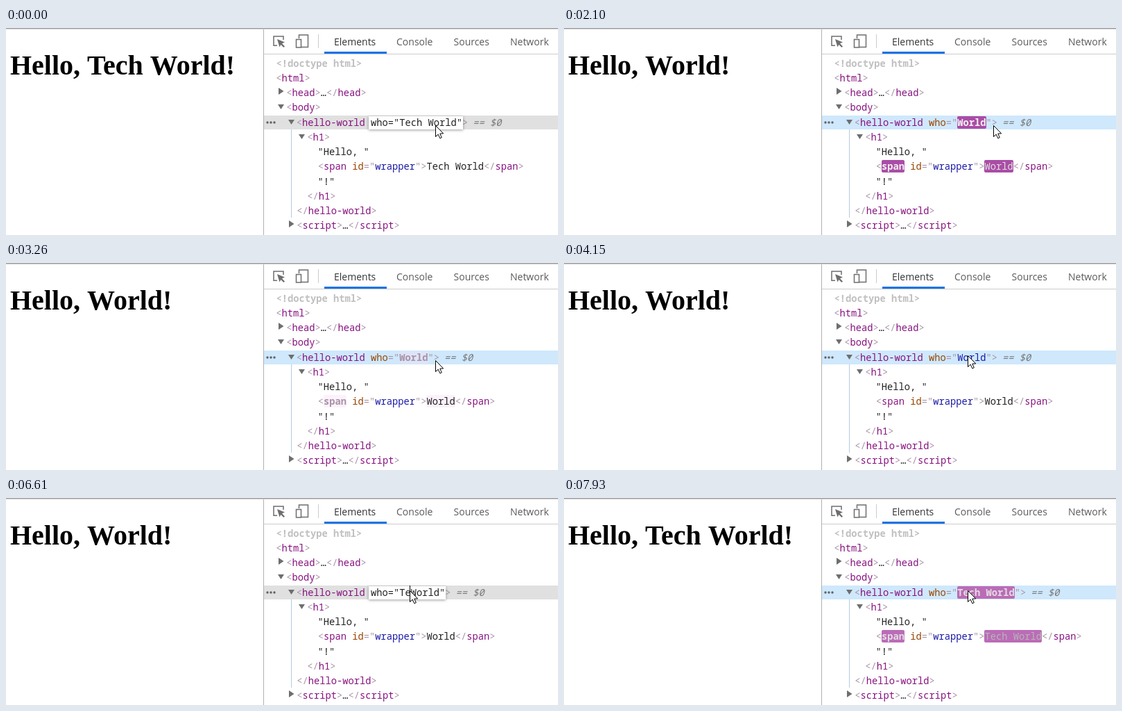
Write an HTML page with a canvas that moves like this. It is 796 by 298 pixels and loops after 8 s.

```html
<!DOCTYPE html>
<html lang="en">
<head>
<meta charset="utf-8">
<title>Editing an attribute</title>
<style>
html, body { margin: 0; width: 100%; height: 100%; overflow: hidden; background: #fff; }
canvas { display: block; }
</style>
</head>
<body>
<canvas id="stage" width="796" height="298"></canvas>
<script>
const ctx = document.getElementById('stage').getContext('2d');
const LOOP = 8000;
const CHAR = 8.25;
const MONO = '13.75px "Noto Sans Mono", monospace';
const LONG = 'Tech World', SHORT = 'World';
const TAG = '#881280', PUNCT = '#a894a6', ATTR = '#994500', VALUE = '#1a1aa6', TEXT = '#222';
const ROW_X = 418.75, VALUE_X = ROW_X + 18 * CHAR;

// Editing states: start time, text, selection length, caret index (-1 = hidden)
const EDITS = [
  [0, LONG, 0, -1], [250, LONG, 5, -1], [530, LONG, 6, -1], [960, LONG, 5, -1],
  [1550, SHORT, 0, 0], [1970, null],
  [5320, SHORT, 5, -1], [5740, SHORT, 0, 0], [6200, SHORT, 0, -1],
  [6350, 'TWorld', 0, 1], [6610, 'TeWorld', 0, 2], [6910, 'TechWorld', 0, 4],
  [7070, LONG, 0, 5], [7650, LONG, 0, -1], [7800, null]
];
const POINTER = [
  [0, 619, 140], [3420, 607, 140], [3570, 600, 139], [3720, 592, 136],
  [3850, 587, 135], [4000, 584, 133], [4150, 582, 133]
];
const FLASH_TICKS = [2100, 2250, 2400, 2530, 2680, 2960, 3260, 3420, 7930];

const latest = (list, t) => list.filter(step => step[0] <= t).pop();
const baseline = row => Math.floor(56 + 21.25 * row);
const mix = (a, b, p) => a.map((v, i) => v + (b[i] - v) * p);
const rgb = (c, alpha = 1) => `rgba(${c.map(Math.round).join()},${alpha})`;

function rect(x, y, w, h, color) {
  ctx.fillStyle = color;
  ctx.fillRect(x, y, w, h);
}

function roundRect(x, y, w, h, r, color) {
  ctx.fillStyle = color;
  ctx.beginPath();
  ctx.roundRect(x, y, w, h, r);
  ctx.fill();
}

function polygon(points, fill, stroke) {
  ctx.beginPath();
  points.forEach(([x, y]) => ctx.lineTo(x, y));
  ctx.closePath();
  ctx.fillStyle = fill;
  ctx.fill();
  if (stroke) {
    ctx.strokeStyle = stroke;
    ctx.lineWidth = 1;
    ctx.stroke();
  }
}

function label(text, x, y, font, color) {
  ctx.font = font;
  ctx.fillStyle = color;
  ctx.fillText(text, x, y);
}

// Draws pairs of text and colour on the fixed character grid.
function code(x, row, parts, style = '') {
  for (const [text, color] of parts) {
    for (const ch of text) {
      label(ch, x, baseline(row), style + MONO, color);
      x += CHAR;
    }
  }
  return x;
}

const tag = (name, slash = '') => [['<' + slash, PUNCT], [name, TAG], ['>', PUNCT]];

function arrow(x, y, open) {
  polygon(open ? [[x, y], [x + 9, y], [x + 4.5, y + 7]]
               : [[x, y], [x + 7.5, y + 5], [x, y + 10]], '#6e6e6e');
}

// Ease of cubic-bezier(0, 0, .2, 1)
function ease(x) {
  let lo = 0, hi = 1;
  for (let i = 0; i < 20; i++) {
    const s = (lo + hi) / 2;
    if (0.6 * s * s + 0.4 * s ** 3 < x) lo = s; else hi = s;
  }
  return 3 * lo * lo - 2 * lo ** 3;
}

function flashAt(t) {
  const tick = FLASH_TICKS.filter(v => v <= t).pop();
  if (!tick || tick === 3420) return null;
  const age = tick - (tick < 5000 ? 2057 : 7805);
  const p = ease(Math.min(1, age / 1120));
  const alpha = age > 1120 ? 1 - ease((age - 1120) / 280) : 1;
  return {
    back: rgb(mix([158, 54, 153], [245, 219, 244], p), alpha),
    ink: base => rgb(mix([255, 255, 255], base, p))
  };
}

function flashText(text, x, row, color, flash, base) {
  if (!flash) return code(x, row, [[text, color]]);
  const left = Math.floor(x), right = Math.round(x + text.length * CHAR);
  roundRect(left, baseline(row) - 14, right - left, 18, 2, flash.back);
  return code(x, row, [[text, flash.ink(base)]], base[0] > 100 ? '600 ' : '');
}

function toolbar() {
  rect(372, 37, 424, 1, '#ccc');
  rect(0, 0, 796, 1, '#9a9a9a');
  rect(0, 1, 796, 1, '#d0d0d0');
  rect(371, 2, 1, 296, '#b0b0b0');
  rect(450, 9, 1, 20, '#ccc');
  rect(459, 34, 90, 3, '#1a73e8');
  const font = '14px "Open Sans", sans-serif';
  label('Elements', 473, 25, font, '#333');
  label('Console', 563, 25, font, '#5a5a5a');
  label('Sources', 645.5, 25, font, '#5a5a5a');
  label('Network', 727, 25, font, '#5a5a5a');

  const gray = '#6e6e6e';
  ctx.strokeStyle = gray;
  ctx.lineWidth = 1.5;
  ctx.beginPath();
  ctx.moveTo(391, 25.3);
  ctx.lineTo(386, 25.3);
  ctx.lineTo(386, 12);
  ctx.lineTo(400, 12);
  ctx.lineTo(400, 17);
  ctx.stroke();
  polygon([[391, 16], [402, 20.5], [398, 22.3], [402, 26.5], [400.5, 28], [396.3, 24], [394.5, 27.5]], gray);
  ctx.strokeRect(422.5, 10, 13, 17.5);
  rect(417, 15, 9, 14, '#fff');
  ctx.strokeRect(418.5, 16.5, 7, 11.5);
}

function hostRow(edit, value, flash) {
  rect(372, 126, 424, 20, edit ? '#e0e0e0' : '#cfe8fc');
  [377, 382, 387].forEach(x => {
    ctx.fillStyle = '#5f6368';
    ctx.beginPath();
    ctx.arc(x, 136, 1.7, 0, 7);
    ctx.fill();
  });
  arrow(407, 132, true);
  let x = code(ROW_X, 4, [['<', PUNCT], ['hello-world ', TAG]]);
  if (edit) {
    const [, text, selected, caret] = edit;
    const width = (text.length + 6) * CHAR;
    code(x + width, 4, [['>', PUNCT]]);
    ctx.save();
    ctx.shadowColor = 'rgba(0,0,0,.4)';
    ctx.shadowBlur = 4;
    ctx.shadowOffsetY = 1;
    rect(523, 127, x + width - 522, 19, '#fff');
    ctx.restore();
    if (selected) rect(567, 127, Math.round(selected * CHAR), 18, '#b4d7fd');
    x = code(x, 4, [[`who="${text}"`, TEXT]]) + CHAR;
    if (caret >= 0) rect(Math.floor(566.25 + caret * CHAR), 126, 1, 18, '#000');
  } else {
    code(x, 4, [['who', ATTR], ['="', PUNCT]]);
    x = flashText(value, VALUE_X, 4, VALUE, flash, [168, 148, 166]);
    x = code(x, 4, [['">', PUNCT]]);
  }
  code(x - 1.25, 4, [[' == $0', '#777']], 'italic ');
}

function tree(edit, value, inner, flash) {
  code(389.5, 0, [['<!doctype html>', '#c0c0c0']], '600 ');
  code(389.25, 1, tag('html'));
  arrow(393, 86, false);
  code(404.25, 2, [...tag('head'), ['…', TEXT], ...tag('head', '/')]);
  arrow(392, 110, true);
  code(404.25, 3, tag('body'));
  hostRow(edit, value, flash);
  rect(411, 146, 1, 127, '#b5cbe0');
  arrow(422, 153, true);
  code(434.25, 5, tag('h1'));
  code(449.5, 6, [['"Hello, "', TEXT]]);
  let x = code(449.75, 7, [['<', PUNCT]]);
  x = flashText('span', x, 7, TAG, flash, [168, 148, 166]);
  x = code(x, 7, [[' id', ATTR], ['="', PUNCT], ['wrapper', VALUE], ['">', PUNCT]]);
  x = flashText(inner, x, 7, TEXT, flash, [34, 34, 34]);
  code(x, 7, tag('span', '/'));
  code(449.5, 8, [['"!"', TEXT]]);
  code(434.25, 9, tag('h1', '/'));
  code(419.25, 10, tag('hello-world', '/'));
  arrow(408, 277, false);
  code(419.25, 11, [...tag('script'), ['…', TEXT], ...tag('script', '/')]);
}

function pointer(x, y) {
  const shape = [[0, 0], [0, 16], [3.7, 12.6], [6.3, 18.3], [8.8, 17.2], [6.3, 11.6], [11.2, 11.4]];
  polygon(shape.map(([dx, dy]) => [x + 0.5 + dx, y + 0.5 + dy]), '#fff', '#000');
}

function draw(t) {
  const state = latest(EDITS, t);
  const edit = state[1] === null ? null : state;
  const pick = (from, to) => t >= from && t < to ? SHORT : LONG;
  const value = pick(1970, 7800);
  rect(0, 0, 796, 298, '#fff');
  label(`Hello, ${value}!`, 6, 67, 'bold 40px "Liberation Serif", serif', '#000');
  toolbar();
  tree(edit, value, pick(2100, 7930), flashAt(t));
  const [, x, y] = latest(POINTER, t);
  pointer(x, y);
}

const start = performance.now();
function tick() {
  draw((performance.now() - start) % LOOP);
  requestAnimationFrame(tick);
}
tick();
</script>
</body>
</html>
```
